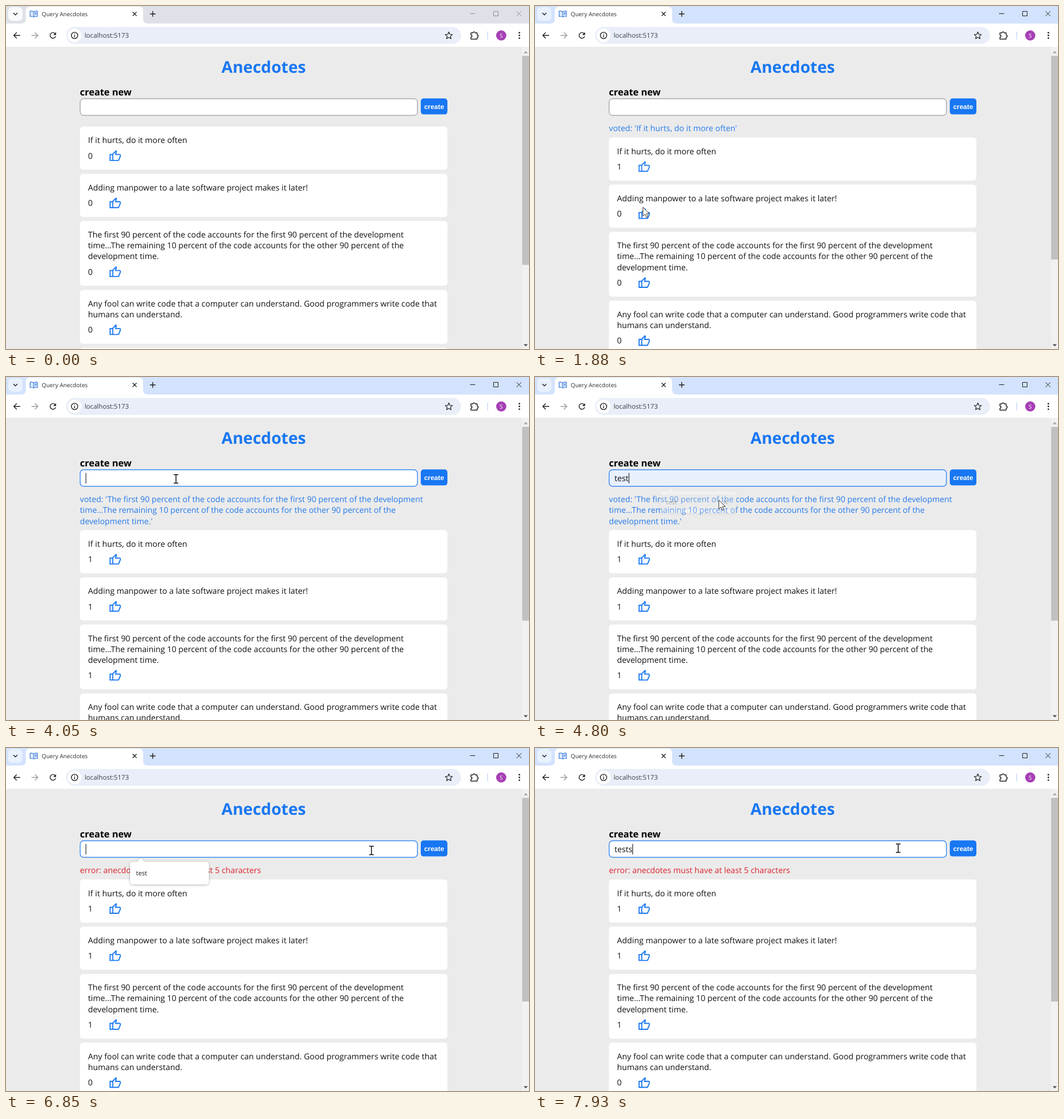
These frames come from a looping animation (923 by 606 pixels, 8000 ms). An HTML page:

```html
<!DOCTYPE html>
<html lang="en">
<head>
<meta charset="utf-8">
<title>Query Anecdotes</title>
<style>
  html, body { margin: 0; width: 100%; height: 100%; overflow: hidden; background: #ebebeb; }
  svg { display: block; font: 14.25px "Open Sans", sans-serif; text-rendering: geometricPrecision; }
  .line { fill: none; stroke: #1f1f1f; stroke-width: 1.4; }
  .button { font: bold 11.95px "Liberation Sans", Arial, sans-serif; fill: #fff; }
  .bold { font-weight: bold; }
</style>
</head>
<body>
<svg width="923" height="606" viewBox="0 0 923 606">
  <defs>
    <path id="thumb" transform="scale(.0238)" d="M720-120H280v-520l280-280 50 50q7 7 11.5 19t4.5 23v14l-44 174h258q32 0 56 24t24 56v80q0 7-2 15t-4 15L794-168q-9 20-30 34t-44 14Zm-360-80h360l120-280v-80H480l54-220-174 174v406Zm-80-440v80H160v360h120v80H80v-520h200Z"/>
    <path id="arrow" d="M.5.5V16.2L4.2 12.8 6.7 18.6 9.2 17.5 6.8 11.9H11.9Z" fill="#fff" stroke="#222" stroke-width=".9"/>
    <path id="beam" d="M-4-7.5H-1Q0-7.5 0-6.5 0-7.5 1-7.5H4M0-7V7M-4 7.5H-1Q0 7.5 0 6.5 0 7.5 1 7.5H4" fill="none" stroke="#000" stroke-width="1.4"/>
    <filter id="shadow" x="-20%" y="-30%" width="140%" height="170%">
      <feDropShadow dx="0" dy="1" stdDeviation="2" flood-opacity=".3"/>
    </filter>
  </defs>

  <g id="page"></g>

  <g id="browser">
    <rect id="strip" width="923" height="32"/>
    <rect id="search" x="4" y="2" width="25" height="24" rx="7"/>
    <path class="line" d="M13 12.3l3.6 3.4 3.6-3.4"/>
    <path d="M27 31Q35 31 35 23V9Q35 1 43 1H234Q242 1 242 9V23Q242 31 250 31H923V72H0V31Z" fill="#fff"/>
    <path d="M49 10.5C47 8.8 44 8.8 42.5 9.2V18.5C44 18.1 47 18.1 49 19.6 51 18.1 54 18.1 55.5 18.5V9.2C54 8.8 51 8.8 49 10.5V19.6M51 12.5l3-.6M51 14.6l3-.6" fill="#dbe9fd" stroke="#3575d8" stroke-width="1.1"/>
    <text x="63" y="18" font-size="10.15" fill="#2a2b2e">Query Anecdotes</text>
    <path class="line" d="M223.5 10.5l7 7m0-7l-7 7M254 14h10m-5-5v10"/>
    <g id="controls" fill="none" stroke-width="1">
      <path d="M819 13.5h9M860.5 9.5h8v8h-8ZM901 9.3l8.6 8.6m0-8.6l-8.6 8.6"/>
    </g>
    <path class="line" d="M25 52H14m5-5.2L13.8 52l5.2 5.2"/>
    <path class="line" style="stroke:#9b9da1" d="M45 52h11m-5-5.2l5.2 5.2-5.2 5.2"/>
    <path class="line" d="M87 49.1A5 5 0 1 0 87.6 53.5"/>
    <path d="M88.3 46.2v5h-5Z" fill="#1f1f1f"/>
    <rect x="106" y="37" width="697" height="30" rx="15" fill="#e9eef8"/>
    <circle cx="121" cy="52" r="12" fill="#fff"/>
    <circle class="line" cx="121" cy="52" r="5.6"/>
    <path class="line" d="M121 51.2v4M121 48.4v1.4"/>
    <text x="138.7" y="56.2" font-size="11.6" fill="#3c3e42">localhost:5173</text>
    <path class="line" stroke-linejoin="round" style="stroke-width:1.2" d="M781.5 45.8l1.8 4.2 4.5.4-3.4 3 1 4.4-3.9-2.3-3.9 2.3 1-4.4-3.4-3 4.5-.4Z"/>
    <path class="line" stroke-linejoin="round" d="M820.5 47.5h3.6a1.9 1.9 0 0 1 3.8 0h3.6v3.8a1.9 1.9 0 0 1 0 3.8v3.4h-11v-3.4a1.9 1.9 0 0 0 0-3.8Z"/>
    <path d="M850 45v14" stroke="#c7dafb" stroke-width="1.5"/>
    <circle cx="874" cy="52" r="9" fill="#a63fb5"/>
    <text x="874" y="55.6" font-size="10" text-anchor="middle" fill="#fff">S</text>
    <g fill="#1f1f1f"><circle cx="906" cy="47.2" r="1.4"/><circle cx="906" cy="52" r="1.4"/><circle cx="906" cy="56.8" r="1.4"/></g>
  </g>

  <g id="overlay"></g>
</svg>
<script>
const $ = id => document.getElementById(id);
const LOOP = 8000, LINE = 19.15, BLUE = '#1877f2';

const anecdotes = [
  ['If it hurts, do it more often'],
  ['Adding manpower to a late software project makes it later!'],
  ['The first 90 percent of the code accounts for the first 90 percent of the development',
   'time...The remaining 10 percent of the code accounts for the other 90 percent of the',
   'development time.'],
  ['Any fool can write code that a computer can understand. Good programmers write code that',
   'humans can understand.'],
  ['']
];
const votes = [1330, 2200, 2940];                      // click times
const hovers = [[1060, 1680], [1960, 2420], [2720, 2950]];
const ACTIVATE = 1260, FOCUS = 3960, PREVIEW = 4330, PICK = 4640,
      SUBMIT = 5500, REFOCUS = 6570, TYPE = 7250, KEY_GAP = 140;

// time, x, y of the pointer
const pointer = [
  [240, 842, 606], [980, 204, 258], [1200, 192, 264], [1560, 192, 266],
  [1880, 190, 355], [2050, 191, 366], [2350, 191, 366], [2640, 192, 455],
  [2860, 193, 486], [3150, 193, 488], [3900, 300, 180], [4100, 300, 180],
  [4400, 322, 217], [4820, 324, 217], [5140, 600, 186], [5400, 769, 178],
  [5690, 769, 178], [5960, 789, 233], [6310, 789, 233], [6560, 660, 180],
  [6850, 645, 181], [7250, 641, 177]
];

const clamp = v => Math.min(1, Math.max(0, v));
const within = (t, a, b) => t >= a && t < b;
const hoverLevel = (t, a, b) => clamp((t - a) / 150) * clamp(1 - (t - b) / 350);

function pointerAt(t) {
  const i = pointer.findIndex(p => p[0] > t);
  if (i === 0) return [0, 700];
  if (i < 0) return pointer.at(-1).slice(1);
  const [t0, x0, y0] = pointer[i - 1], [t1, x1, y1] = pointer[i];
  const u = (t - t0) / (t1 - t0), e = u * u * (3 - 2 * u);
  return [x0 + (x1 - x0) * e, y0 + (y1 - y0) * e];
}

const text = (x, y, s, attrs = '') => `<text x="${x}" y="${y}" ${attrs}>${s}</text>`;
const rect = (x, y, w, h, r, attrs) =>
  `<rect x="${x}" y="${y}" width="${w}" height="${h}" rx="${r}" ${attrs}/>`;
const lines = (list, x, y, attrs) => list.map((s, i) => text(x, y + i * LINE, s, attrs)).join('');

function notification(t) {
  if (t >= SUBMIT) return ['error: anecdotes must have at least 5 characters'];
  const last = votes.filter(v => t >= v).length - 1;
  if (last < 0) return [];
  const quoted = [...anecdotes[last]];
  quoted[0] = "voted: '" + quoted[0];
  quoted[quoted.length - 1] += "'";
  return quoted;
}

function cards(t, top) {
  return anecdotes.map((body, i) => {
    const height = 57.1 + LINE * body.length, base = top + 29.3;
    const countY = base + LINE * (body.length - 1) + 27.3;
    const light = hovers[i] ? hoverLevel(t, ...hovers[i]) : 0;
    const count = t >= votes[i] + 150 ? 1 : 0;
    const out = rect(130.5, top, 648.5, height, 5.5, 'fill="#fff"') +
      lines(body, 144.8, base, 'fill="#111"') + text(144.8, countY, count, 'fill="#111"') +
      `<use href="#thumb" x="180.8" y="${countY + 7}" fill="${BLUE}" opacity="${1 - .22 * light}"/>`;
    top += height + 7.1;
    return out;
  }).join('');
}

function form(t, value, focused) {
  const filled = within(t, PREVIEW, SUBMIT);
  const light = hoverLevel(t, 5330, 5740);
  const ring = within(t, SUBMIT - 60, REFOCUS)
    ? rect(731.2, 161.9, 49, 31, 6.5, `fill="#fff" stroke="${BLUE}" stroke-width="1.8"`) : '';
  const caretX = 141 + 1.744 * 14.25 * (value === 'test') + [0, 5, 13, 19.8, 0, 31.4][value.length] * (value !== 'test');
  return text(130.5, 158, 'create new', 'class="bold" font-size="16.55"') +
    rect(130.9, 163.9, 595.2, 29.3, 6,
      `fill="${filled ? '#e8f0fe' : '#fff'}" stroke="${focused ? BLUE : '#858590'}" stroke-width="${focused ? 1.2 : 1}"`) +
    text(140.2, 184, value, 'fill="#111"') +
    (focused ? `<path d="M${caretX} 169.5v18.5" stroke="#000"/>` : '') + ring +
    rect(732, 163.2, 47, 28.4, 5, 'fill="#fff"') +
    rect(732, 163.2, 47, 28.4, 5, `fill="${BLUE}" opacity="${1 - .2 * light}"`) +
    text(737.9, 181.5, 'create', 'class="button"');
}

function suggestion(t) {
  const first = t < SUBMIT;
  const [open, close] = first ? [FOCUS + 110, PICK + 60] : [REFOCUS + 110, TYPE + 4 * KEY_GAP];
  const opacity = clamp((t - open) / 100) * clamp(1 - (t - close) / (first ? 145 : 90));
  if (!opacity) return '';
  const hovered = first && t >= PREVIEW;
  const shrink = t > close ? .965 : 1;
  return `<g opacity="${t > close ? Math.max(opacity, first ? .3 : 0) : opacity}" transform="translate(288.5 221) scale(${shrink}) translate(-288.5 -221)">
    <path filter="url(#shadow)" fill="#fff" d="M225 201H231.5L238 195 244.5 201H352Q358 201 358 207V235Q358 241 352 241H225Q219 241 219 235V207Q219 201 225 201Z"/>
    ${hovered ? rect(219, 207, 139, 28, 0, 'fill="#ececec"') : ''}
    ${text(229.5, 225, 'test', 'font-size="11.2" fill="#1f1f1f"')}
    ${hovered ? '<path class="line" style="stroke-width:1.1" d="M335 217.5l7 7m0-7l-7 7"/>' : ''}</g>`;
}

function scrollbar(extraLines) {
  const height = 505 * 534 / (730 + LINE * extraLines);
  return rect(911, 72, 12, 534, 0, 'fill="#f1f1f1"') + rect(911, 88, 12, height, 0, 'fill="#c1c1c1"') +
    '<path d="M913.5 83.5l3.7-4 3.7 4Z" fill="#a3a3a3"/><path d="M913.5 597.5l3.7 4 3.7-4Z" fill="#505050"/>';
}

function render(t) {
  const note = notification(t);
  const focused = within(t, FOCUS, SUBMIT - 60) || t >= REFOCUS;
  const typed = Math.floor((t - TYPE) / KEY_GAP) + 1;
  const value = t < SUBMIT ? (t >= PREVIEW ? 'test' : '') : 'tests'.slice(0, Math.max(0, typed));

  $('page').innerHTML = rect(0, 72, 923, 534, 0, 'fill="#ebebeb"') +
    text(454.7, 118, 'Anecdotes', `class="bold" font-size="28.5" text-anchor="middle" fill="${BLUE}"`) +
    form(t, value, focused) +
    lines(note, 130.5, 221.2, `fill="${t >= SUBMIT ? '#dc232d' : '#267bea'}"`) +
    cards(t, 213.1 + LINE * note.length) + scrollbar(note.length);

  const active = t >= ACTIVATE;
  $('strip').setAttribute('fill', active ? '#d3e2fd' : '#dee2e8');
  $('search').setAttribute('fill', active ? '#e9f1fe' : '#fafbfc');
  $('controls').setAttribute('stroke', active ? '#1f1f1f' : '#8b8e92');

  const [x, y] = pointerAt(t);
  const inInput = within(x, 131, 726) && within(y, 164, 194);
  const beam = inInput || within(t, votes[2], 3400);
  $('overlay').innerHTML = suggestion(t) + `<use href="#${beam ? 'beam' : 'arrow'}" x="${x}" y="${y}"/>`;
}

function tick() {
  render(performance.now() % LOOP);
  requestAnimationFrame(tick);
}
tick();
</script>
</body>
</html>
```
